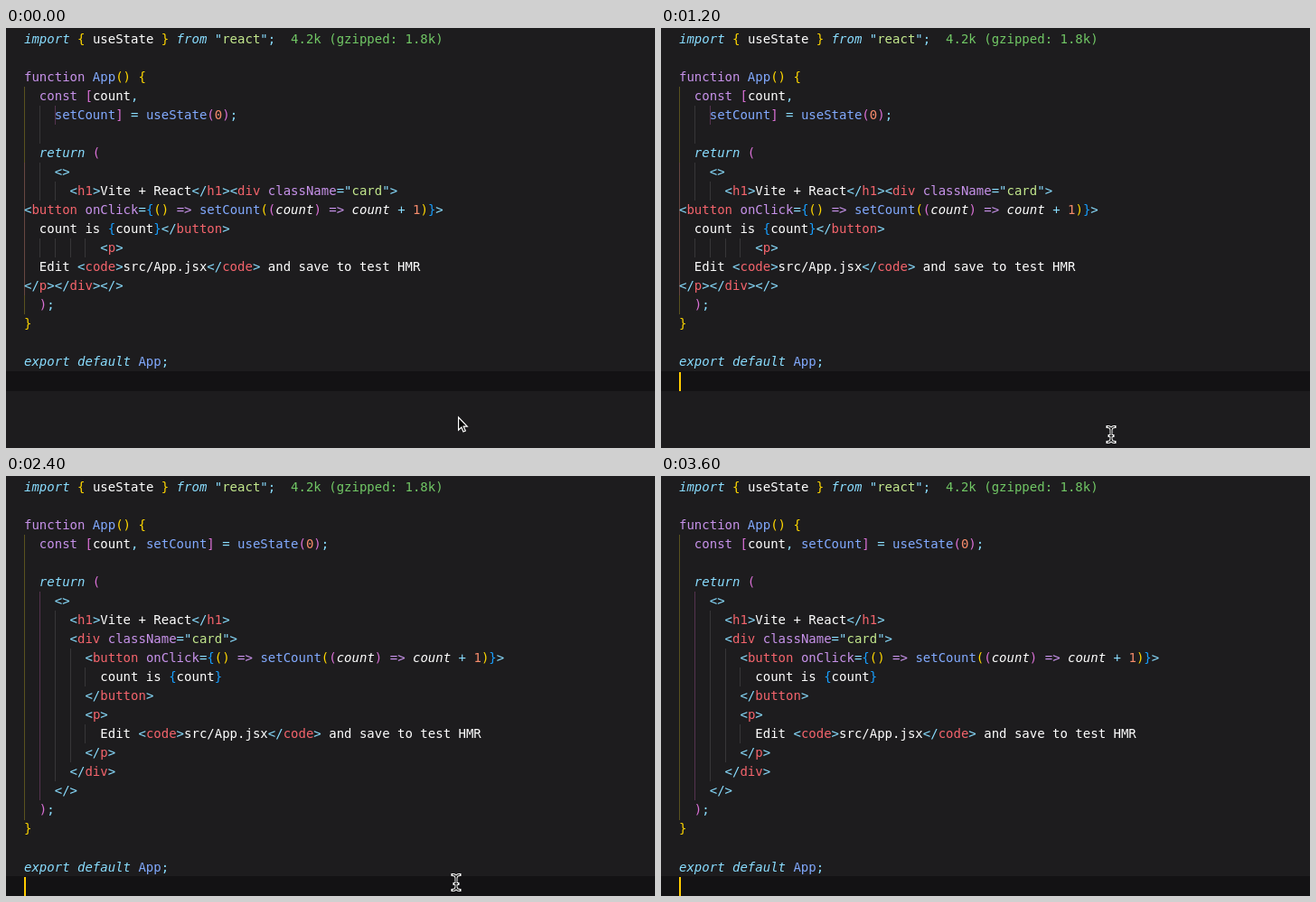
Recreate the animation shown at these times as an HTML page. Size 718x465 px, loop 3.7 s.

```html
<!DOCTYPE html>
<html lang="en">
<head>
<meta charset="utf-8">
<title>Format on save</title>
<style>
  html, body { margin: 0; width: 100%; height: 100%; overflow: hidden; background: #1d1c1e; }
  body { position: relative; --line: 21.05px; --char: 8.43px; --loop: 3700ms step-end infinite; }

  .doc { position: absolute; inset: 0; }
  .raw { animation: raw var(--loop); }
  .tidy { animation: tidy var(--loop); }

  pre {
    position: absolute; left: 20px; top: 1.6px; margin: 0; color: #fff;
    font: 14px/var(--line) "DejaVu Sans Mono", monospace;
  }
  .bar { position: absolute; left: 0; width: 100%; height: 22px; background: #131214; }
  .caret {
    position: absolute; left: 20px; width: 2px; height: 21px; background: #ffcc00;
    animation: blink var(--loop);
  }
  .guide {
    position: absolute; width: 1px; background: #373638;
    left: calc(20px + var(--col) * var(--char));
    top: calc(1.6px + var(--from) * var(--line));
    height: calc(var(--rows) * var(--line));
  }
  .guide.gold { background: #59521f; }
  .guide.pink { background: #553350; }
  .guide.rust { background: #684741; }

  .i { color: #89ddff; font-style: italic; }
  .c { color: #89ddff; }
  .p { color: #c792ea; }
  .f { color: #82aaff; }
  .t { color: #f4646c; }
  .s { color: #c3e88d; }
  .n { color: #f78c6c; }
  .g { color: #71c765; }
  .y { color: #ffd700; }
  .o { color: #da70d6; }
  .b { color: #179fff; }
  .a { font-style: italic; }

  svg { position: absolute; left: 0; top: 0; overflow: visible; }
  .arrow { animation: move 400ms ease-in-out both, arrow var(--loop); }
  .arrow { animation: glide 3700ms infinite, arrow var(--loop); }
  .beam { animation: beam var(--loop); }

  @keyframes raw { 0% { visibility: visible } 37.83%, 100% { visibility: hidden } }
  @keyframes tidy { 0% { visibility: hidden } 37.83%, 100% { visibility: visible } }
  @keyframes blink {
    0%, 51.35%, 78.37% { opacity: 0 }
    27.02%, 64.86%, 91.89% { opacity: 1 }
    100% { opacity: 1 }
  }
  @keyframes glide {
    0% { transform: translate(500px, 430px); animation-timing-function: ease-in-out }
    10.8%, 100% { transform: translate(497px, 449px) }
  }
  @keyframes arrow { 0% { opacity: 1 } 27.02%, 100% { opacity: 0 } }
  @keyframes beam {
    0% { opacity: 0 }
    27.02% { opacity: 1 }
    67.56%, 100% { opacity: 0 }
  }
</style>
</head>
<body>
<script>
  // Each "|" segment starts with the letter of its colour class.
  const head = ['iimport |y{ |wuseState |y} |ifrom |c"|sreact|c";|g  4.2k (gzipped: 1.8k)', '',
    'pfunction |fApp|y() {'];
  const tail = ['w  |o)|c;', 'y}', '', 'iexport default |fApp|c;'];
  const open = 'p  const |o[|wcount|c,';
  const state = 'fsetCount|o] |c= |fuseState|o(|n0|o)|c;';
  const ret = 'i  return |o(';
  const frag = 'c    <>';
  const tag = (name, slash = '') => `c<${slash}|t${name}|c>`;
  const title = tag('h1') + '|wVite + React|' + tag('h1', '/');
  const card = 'c<|tdiv |pclassName|c="|scard|c">';
  const button = 'c<|tbutton |ponClick|c=|b{|y() |p=> |fsetCount|y(|o(|acount|o) |p=> ' +
    '|acount |c+ |n1|y)|b}|c>';
  const label = 'wcount is |b{|wcount|b}';
  const edit = 'wEdit |' + tag('code') + '|wsrc/App.jsx|' + tag('code', '/') + '|w and save to test HMR';
  const pad = (n, text) => 'w' + ' '.repeat(n) + '|' + text;

  const raw = [...head, open, pad(4, state), '', ret, frag,
    pad(6, title + '|' + card), button, pad(2, label + '|' + tag('button', '/')),
    pad(10, tag('p')), pad(2, edit),
    tag('p', '/') + '|' + tag('div', '/') + '|c</>', ...tail];

  const tidy = [...head, open + ' |' + state, '', ret, frag,
    pad(6, title), pad(6, card), pad(8, button), pad(10, label), pad(8, tag('button', '/')),
    pad(8, tag('p')), pad(10, edit), pad(8, tag('p', '/')), pad(6, tag('div', '/')),
    'c    </>', ...tail];

  // Guides: column, first line, line count, tint
  const rawGuides = [[0, 3, 4, 'gold'], [0, 7, 7, 'rust'], [0, 14, 1, 'gold'],
    [2, 4, 2], [4, 4, 1, 'pink'], [2, 7, 2], [4, 8, 1],
    [2, 11, 1], [4, 11, 1], [6, 11, 1], [8, 11, 1]];
  const tidyGuides = [[0, 3, 15, 'gold'], [2, 6, 11, 'pink'], [4, 7, 9], [6, 9, 6],
    [8, 10, 1], [8, 13, 1]];

  function add(parent, name, className, css = '') {
    const el = document.createElement(name);
    el.className = className;
    el.style.cssText = css;
    return parent.appendChild(el);
  }

  function build(name, lines, guides, caretTop) {
    const doc = add(document.body, 'div', 'doc ' + name);
    add(doc, 'div', 'bar', `top:${caretTop - 1}px`);
    for (const [col, from, rows, tint = ''] of guides)
      add(doc, 'div', 'guide ' + tint, `--col:${col};--from:${from};--rows:${rows}`);
    const pre = add(doc, 'pre', '');
    for (const line of lines) {
      for (const part of line.split('|'))
        if (part) add(pre, 'span', part[0]).textContent = part.slice(1);
      pre.append('\n');
    }
    add(doc, 'div', 'caret', `top:${caretTop}px`);
  }

  build('raw', raw, rawGuides, 381);
  build('tidy', tidy, tidyGuides, 444);

  document.body.insertAdjacentHTML('beforeend', `
    <svg class="arrow" width="12" height="18">
      <path d="M.6 1V15.2L3.9 12.1 6 17 8.3 16 6.2 11.2H10.3Z" fill="#000" stroke="#fff" stroke-width="1.2"/>
    </svg>
    <svg class="beam" width="718" height="465" fill="none">
      <g id="bar"><path d="M494 441.5Q498 441.5 498 445V455Q498 458.5 494 458.5M502 441.5Q498 441.5 498 445M498 455Q498 458.5 502 458.5M496 451.5H500"
        stroke="#fff" stroke-width="3" stroke-linecap="square"/></g>
      <path d="M494 441.5Q498 441.5 498 445V455Q498 458.5 494 458.5M502 441.5Q498 441.5 498 445M498 455Q498 458.5 502 458.5M496 451.5H500"
        stroke="#111" stroke-width="1.2"/>
    </svg>`);
</script>
</body>
</html>
```
